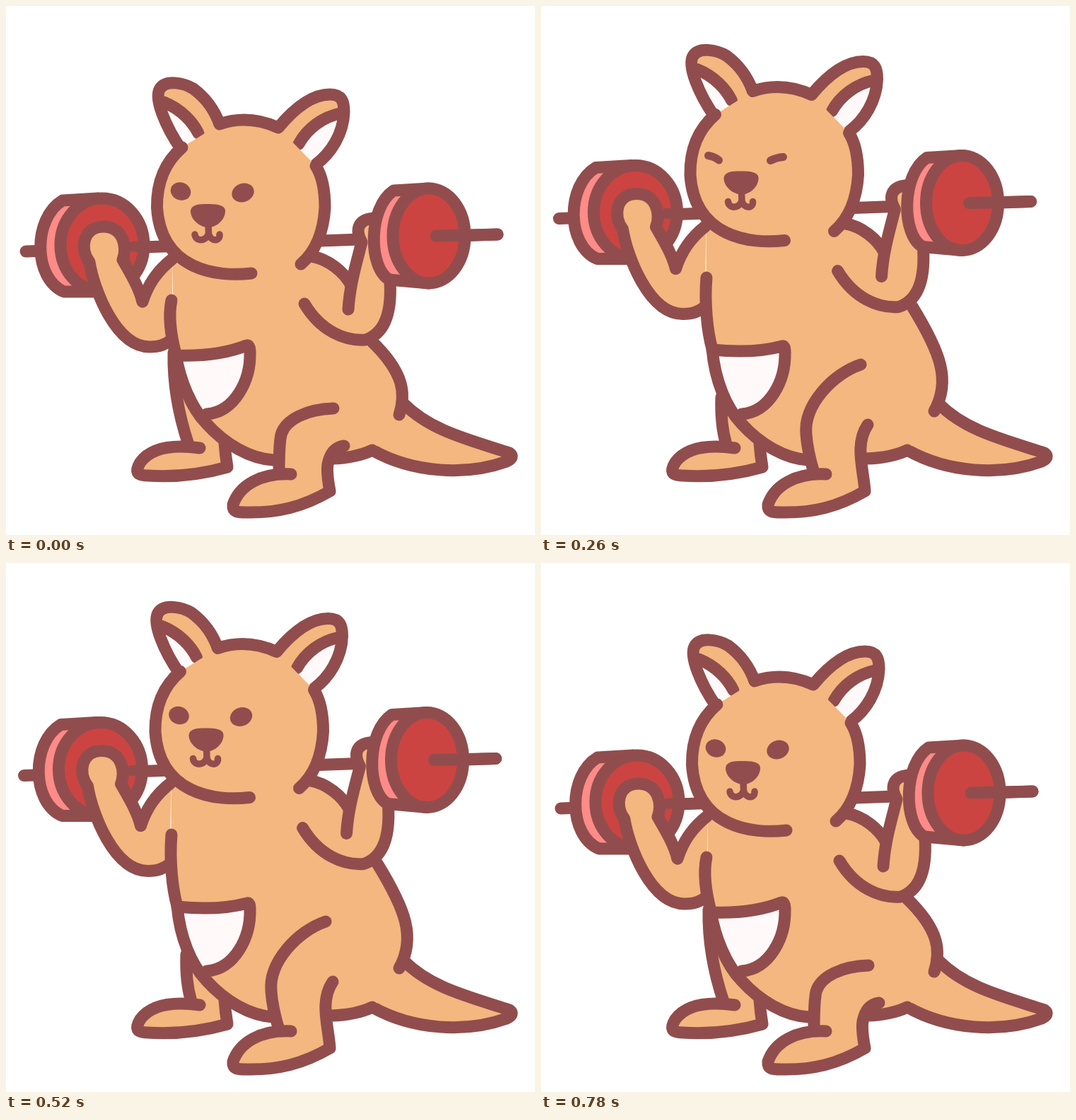
An HTML page with a canvas for the animation above (0.91 s loop, 748 by 748 pixels).

```html
<!DOCTYPE html>
<html lang="en">
<head>
<meta charset="utf-8">
<title>Kangaroo squats</title>
<style>
html, body { margin: 0; width: 100%; height: 100%; overflow: hidden; background: #fff; }
canvas { display: block; width: 748px; height: 748px; }
</style>
</head>
<body>
<canvas id="stage" width="748" height="748"></canvas>
<script>
const ctx = document.getElementById('stage').getContext('2d');
const LINE = '#914d4d', FUR = '#f3b77f', RED = '#cb4442', PINK = '#fd8b88', PALE = '#fffaf9';
const STEP = 130, WEIGHT = 17;

const fill = (d, color) => { ctx.fillStyle = color; ctx.fill(new Path2D(d)); };
const line = (d, width = WEIGHT) => {
  ctx.strokeStyle = LINE;
  ctx.lineWidth = width;
  ctx.lineCap = ctx.lineJoin = 'round';
  ctx.stroke(new Path2D(d));
};
const shape = (d, color) => { fill(d, color); line(d); };
const ellipse = (x, y, rx, ry, color, angle = 0, outlined = false) => {
  ctx.beginPath();
  ctx.ellipse(x, y, rx, ry, angle, 0, Math.PI * 2);
  ctx.fillStyle = color;
  ctx.fill();
  if (!outlined) return;
  ctx.strokeStyle = LINE;
  ctx.lineWidth = WEIGHT;
  ctx.stroke();
};

// Squat poses, from lowest to standing. Hind leg, thigh and calf end at the feet.
const poses = [
  {
    dx: 0, dy: 0,
    chest: 'M234 416 C229 440 233 465 240 492',
    side: '556 578 C565 550 565 520 516 473',
    pocketTop: 'M242 494 Q300 496 340 480',
    hindLeg: 'M237 490 C236 535 243 575 258 620',
    thigh: 'M463 569 C425 570 395 585 389 606 C386 620 386 640 386 660',
    calf: 'C456 675 453 660 455 648 C458 633 465 624 478 622'
  },
  {
    dx: 0, dy: -23.5,
    chest: 'M237 396 C228 430 231 465 241 490',
    side: '550 579 C575 545 570 515 522 452',
    pocketTop: 'M242 494 Q300 496 341 481',
    hindLeg: 'M247 548 C247 570 250 595 262 620',
    thigh: 'M445 547 C425 560 395 583 385 603 C380 620 384 640 385 660',
    calf: 'C456 650 452 622 478 609'
  },
  {
    dx: -2.5, dy: -46.5,
    chest: 'M234 384 C231 420 235 460 242 485',
    side: '556 573 C580 530 565 490 525 425',
    pocketTop: 'M242 486 Q300 492 341 481',
    hindLeg: 'M255 553 C254 580 256 600 262 620',
    thigh: 'M452 507 C413 520 371 564 375 606 C376 620 380 640 386 660',
    calf: 'C456 655 443 620 462 592'
  },
  {
    dx: -4.5, dy: -67.5,
    chest: 'M234 352 C233 395 233 440 240 475',
    side: '555 569 C578 520 572 465 528 398',
    pocketTop: 'M241 479 Q295 490 342 481',
    hindLeg: 'M261 562 C261 585 263 600 266 620',
    thigh: 'M473 501 C415 488 378 535 380 590 C381 615 384 640 390 660',
    calf: 'C458 650 450 615 447 591'
  }
];
const order = [0, 1, 2, 3, 2, 1, 0];
const eyesOpen = [true, false, false, false, true, false, true];

const BELLY = ' C246 530 262 568 283 590 C310 620 345 640 378 642';
const POCKET_SIDE = ' Q345 479 345 490 C346 530 323 574 284 577';

function drawHindLeg(p) {
  const foot = '274 625 C245 621 208 621 190 645 C182 658 184 664 200 664 ' +
    'C245 667 285 660 313 652 C311 640 310 632 309 618';
  fill(`${p.hindLeg} L${foot} L290 570Z`, FUR);
  line(p.hindLeg);
  line('M' + foot);
}

function drawTail() {
  shape('M562 562 C600 600 650 612 712 632 Q720 638 708 644 C650 665 575 660 518 628', FUR);
}

function drawPlate(back, x, y, rx, ry) {
  shape(back, PINK);
  ellipse(x, y, rx, ry, RED, 0, true);
}

function drawRightArm() {
  const forearm = 'M520 300 C496 302 494 318 503 334 C495 365 486 395 484 429';
  const elbow = '422 421 C445 460 480 474 508 472 C540 462 545 425 543 390';
  fill(`${forearm} L${elbow}Z`, FUR);
  line('M432 354 C456 358 478 376 488 395');
  line(forearm);
  line('M' + elbow);
}

function drawLeftArm() {
  const arm = 'M193 418 C188 398 176 378 165 359 C172 342 166 312 138 312 ' +
    'C108 312 104 345 118 362 C124 400 155 482 203 482 C218 482 226 478 234 472';
  const shoulder = '236 357 C213 375 201 394 193 418';
  fill(`${arm} L${shoulder}Z`, FUR);
  line(arm);
  line('M' + shoulder);
}

function drawEars() {
  const left = 'M248 203 C225 170 210 132 217 118 C225 103 252 109 265 117 C285 132 295 148 302 167';
  fill(left + ' L290 210Z', FUR);
  fill('M224 140 C248 148 263 165 276 183 L254 206Z', PALE);
  line('M223 136 C248 146 264 164 272 180');
  line(left);

  const right = 'M385 172 C405 148 430 125 458 125 C475 125 478 135 478 150 C477 180 460 208 438 224';
  fill(right + ' L390 215Z', FUR);
  fill('M472 152 C435 172 425 185 410 198 L432 226 C455 208 468 180 472 152Z', PALE);
  line('M414 195 C426 173 448 157 472 152');
  line(right);
}

function drawFace(open) {
  if (open) {
    ellipse(247, 262, 14.5, 12.5, LINE, 0.35);
    ellipse(335, 264, 16, 13, LINE, -0.35);
  } else {
    line('M239 258 Q247 259 254 264.5', 11);
    line('M327 265 Q336 260.5 345 260', 11);
  }
  fill('M261 290 C262 280 275 280 285 280 C298 280 310 281 310 290 ' +
    'C310 302 298 313 286 313 C274 313 261 302 261 290Z', LINE);
  line('M267 323 C268 333 282 334 286.5 322 L286 308 M286.5 322 C290 334 303 333 302 323', 9.5);
}

function drawHead(open) {
  drawEars();
  const left = 'M347 378 C298 384 219 373 213.5 285 C213 245 228 218 249 200';
  const top = '302 167 Q343 153 385 172';
  const right = '438 226 C450 245 451 270 451 285 C449 320 437 348 417 365';
  fill(`${left} L${top} L${right}Z`, FUR);
  line(left);
  line('M' + top);
  line('M' + right);
  drawFace(open);
}

function drawUpperBody(open) {
  fill('M236 364 L432 354 C456 358 478 376 488 395 L518 473 L236 473Z', FUR);
  drawRightArm();
  drawPlate('M598 258 L548 261 C512 285 512 370 542 387 L598 392', 598, 325, 51, 67);
  line('M608 325 L695 323');
  drawPlate('M130 272 L80 275 C38 300 38 385 82 404 L130 404', 136, 338, 59, 66);
  line('M180 340 L220 340', 15);
  drawLeftArm();
  drawHead(open);
}

function drawFrontLeg(p) {
  const foot = '403 662 C360 660 330 678 321 705 C320 715 326 716 340 716 C385 717 420 708 458 686';
  fill(`${p.thigh} L${foot} ${p.calf}Z`, FUR);
  line(p.thigh);
  line(`M${foot} ${p.calf}`);
}

function draw(p, open) {
  const lifted = paint => {
    ctx.save();
    ctx.translate(p.dx, p.dy);
    paint();
    ctx.restore();
  };
  const front = p.chest + BELLY;
  const pocket = p.pocketTop + POCKET_SIDE;

  ctx.fillStyle = '#fff';
  ctx.fillRect(0, 0, 748, 748);
  lifted(() => line('M28 347 L695 323'));
  drawHindLeg(p);
  drawTail();
  fill(`${front} L462 637 L518 628 L562 590 L${p.side}Z`, FUR);
  lifted(() => drawUpperBody(open));
  line('M' + p.side);
  line('M460 640 Q495 639 518 628');
  fill(pocket + ' C262 560 250 525 243 490Z', PALE);
  line(pocket);
  line(front);
  drawFrontLeg(p);
}

function tick() {
  const step = Math.floor(performance.now() / STEP) % order.length;
  draw(poses[order[step]], eyesOpen[step]);
  requestAnimationFrame(tick);
}
tick();
</script>
</body>
</html>
```
